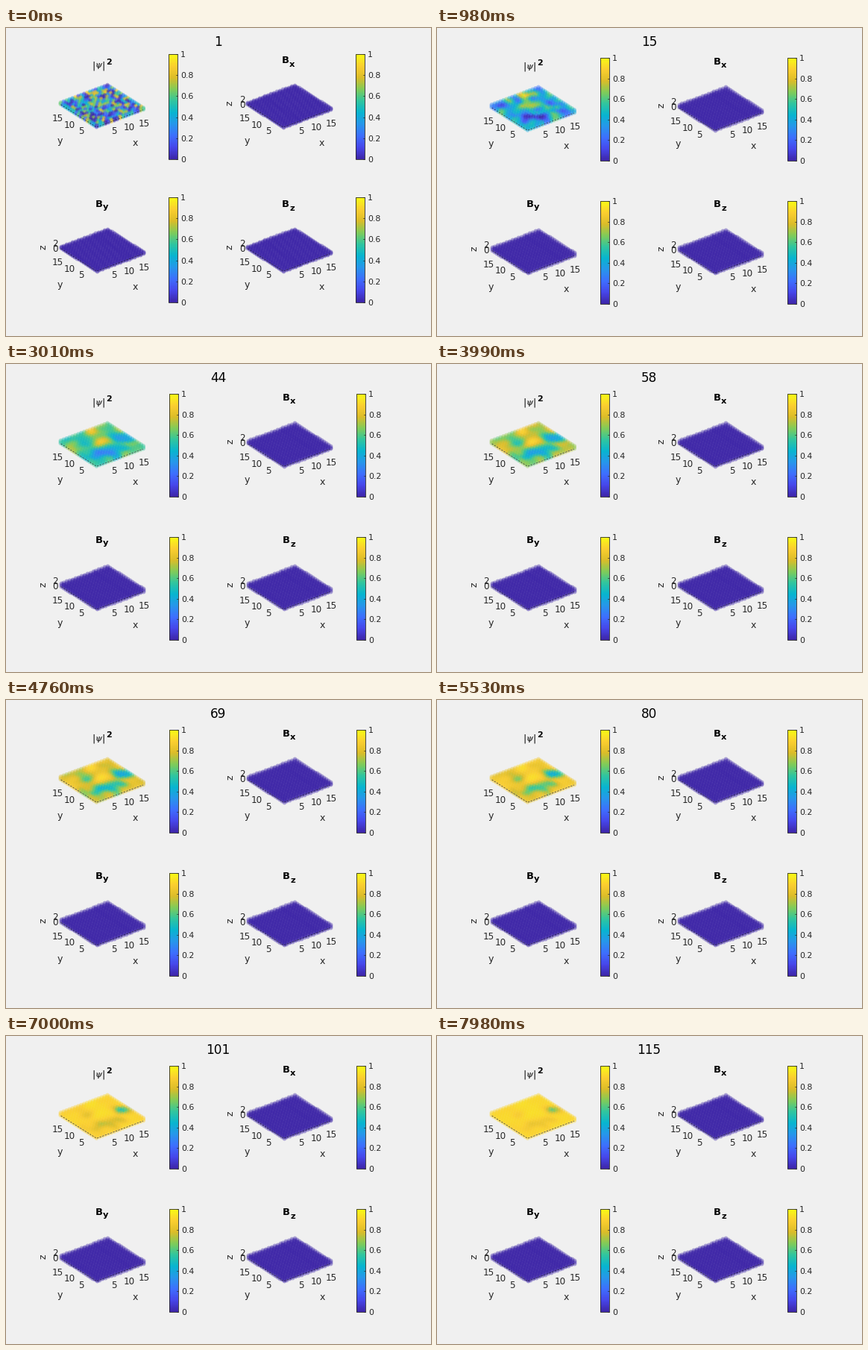
Recreate the animation shown at these times as a matplotlib script. Size 570 by 413 pixels, loop 8000 ms.

```python
import numpy as np
import matplotlib
import matplotlib.pyplot as plt
from matplotlib.animation import FuncAnimation
from matplotlib.colors import LinearSegmentedColormap
from matplotlib.patches import Rectangle

W, H, DPI = 570, 413, 100
STEP, FRAMES, HOLD = 40, 200, 70
PX = 72 / DPI
INK = "#262626"
SIDE, LAYERS, ALPHA = 17, 3, .4

matplotlib.rcParams["font.family"] = "DejaVu Sans"
parula = LinearSegmentedColormap.from_list("parula", [
    "#3e26a8", "#4747eb", "#3e6fff", "#2797eb", "#08b5d0",
    "#31c69f", "#81cc59", "#dcbd29", "#fccf30", "#f9fb15"])

fig = plt.figure(figsize=(W / DPI, H / DPI), dpi=DPI, facecolor="#f0f0f0")
ax = fig.add_axes([0, 0, 1, 1])

# Lattice seen from azimuth -37.5, elevation 30, sorted back to front
UX, UY = np.array([3.91, -1.46]), np.array([-3.0, -1.90])
J, I = (g.ravel() for g in np.mgrid[0:SIDE, 0:SIDE])
order = np.argsort(I * UX[1] + J * UY[1], kind="stable")
I, J = I[order], J[order]


# --- field -----------------------------------------------------------
rng = np.random.default_rng(11)
freq = 2 * np.pi * np.fft.fftfreq(SIDE)
k2 = freq[:, None] ** 2 + freq[None, :] ** 2


def smooth(grid, sigma):
    """Periodic Gaussian blur, rescaled to zero mean and unit spread."""
    out = np.fft.ifft2(np.fft.fft2(grid) * np.exp(-k2 * sigma ** 2 / 2)).real
    return (out - out.mean()) / out.std()


def dip(i, j, r):
    return np.exp(-((I - i) ** 2 + (J - j) ** 2) / (2 * r * r))


grain = rng.uniform(-1, 1, (SIDE, SIDE))
# Steps by which each site lags behind in the rise to full density
delay = 12 * smooth(rng.normal(size=(SIDE, SIDE)), 1.2)[J, I] - 4
delay += 44 * (dip(14, 7.1, 1.7) + dip(5.6, 4.4, 1.7))
delay += 22 * (dip(12.2, 1.4, 1.8) + dip(4.8, 11, 1.5))


def density(n):
    rise = 1 / (1 + np.exp((54 + delay - n) / 16))
    rough = smooth(grain, .26 * np.sqrt(n - 1))[J, I]
    return np.clip(.36 + .56 * rise + .27 * np.exp((1 - n) / 30) * rough, 0, 1)


def colours(n):
    return np.repeat(parula(density(n)), LAYERS, axis=0)


# --- drawing helpers -------------------------------------------------
def put(x, y, s, size=12, drop=.365, ha="center", color=INK, **kw):
    """Text whose visible middle lies at (x, y)."""
    return ax.text(x, y + drop * size, s, fontsize=size * PX, ha=ha,
                   va="baseline", color=color, zorder=5, **kw)


def middle(letter):
    return .17 if letter == "y" else .27


def slab(corner, thick, color):
    ground = corner + I[:, None] * UX + J[:, None] * UY
    pts = np.repeat(ground, LAYERS, axis=0)
    pts[:, 1] -= np.tile(np.linspace(0, thick, LAYERS), len(ground))
    dots = ax.scatter(pts[:, 0], pts[:, 1], s=(5.9 * PX) ** 2, c=color,
                      alpha=ALPHA, linewidths=0, zorder=3)
    path = corner + np.array([16 * UY, 0 * UX, 16 * UX]) + [0, .5]
    edge, = ax.plot(path[:, 0], path[:, 1], color="#1a1a2a", lw=.55,
                    alpha=.8, dashes=(3, 2), zorder=4)
    return dots, edge


def bar(x, top, bottom, width=12):
    ramp = np.linspace(1, 0, 256)[:, None]
    right = x + width
    out = [ax.imshow(ramp, cmap=parula, vmin=0, vmax=1, aspect="auto",
                     extent=(x, right, bottom, top), zorder=2),
           ax.add_patch(Rectangle((x, top), width, bottom - top, fill=False,
                                  ec=INK, lw=.6, zorder=3))]
    for v in np.linspace(0, 1, 6):
        y = bottom + (top - bottom) * v
        out += ax.plot([right - 2, right], [y, y], color=INK, lw=.5, zorder=3)
        out.append(put(right + 4, y, f"{v:.1g}", 11, ha="left"))
    return out


def title(x, y, sub):
    bold = dict(color="black", weight="bold")
    if sub:
        return [put(x, y, "B", 13, **bold),
                put(x + 9, y + 6, sub, 11.5, drop=middle(sub), **bold)]
    return [put(x - 7, y + 8.5, "|", 12.5, drop=.26, color="black"),
            put(x - .5, y + 8.5, "ψ", 11.5, drop=.2, family="DejaVu Serif",
                style="italic", color="black"),
            put(x + 6.5, y + 8.5, "|", 12.5, drop=.26, color="black"),
            put(x + 13.5, y + 2, "2", 11, **bold)]


def panel(dx, dy, sub, fall):
    """Labels of one plot; fall is how far its front corner has dropped."""
    out = title(124.5 + dx, 235.5 + dy, sub)
    base = 331 + fall + dy
    for m in range(3):
        tick = str(5 + 5 * m)
        out.append(put(101.3 + dx - 16 * m, base - 8.7 * m, tick))
        out.append(put(145.3 + dx + 20 * m, base - 5.1 * m, tick))
    out.append(put(72.7 + dx, base + 14.8, "y", 12.5, drop=middle("y")))
    out.append(put(173.2 + dx, base + 16.5, "x", 12.5, drop=middle("x")))
    if sub:
        z = 296 + fall / 2 + dy
        out += [put(66.3 + dx, z, "0"), put(66.3 + dx, z - 7, "2"),
                ax.text(56.5 + dx, z - 2, "z", rotation=90, ha="right",
                        va="center", fontsize=12.5 * PX, color=INK, zorder=5)]
    return out


def layout(right, up, fall, bar_x, bar_top, bar_len):
    """All artists of one layout, and the dots that change colour."""
    out, live = [], None
    for sub, dx, dy in zip(["", "x", "y", "z"], [0, right] * 2,
                           [up, up, 0, 0]):
        color = [parula(0.0)] if sub else colours(1)
        corner = np.array([121.5 + dx, 325.6 + fall + dy])
        dots, edge = slab(corner, 2.2 + fall / 2, color)
        live = live or dots
        out += panel(dx, dy, sub, fall) + [dots, edge]
    for x in (bar_x, bar_x + 251):
        for top in (bar_top, bar_top + 192):
            out += bar(x, top, top + bar_len)
    return out, live


first, first_dots = layout(250.5, -193, 0, 218, 35, 141)
later, later_dots = layout(251, -191.5, 2.7, 219, 40, 138)
counter = put(284.5, 17.5, "1", 16.9, color="black")

ax.set_xlim(0, W)
ax.set_ylim(H, 0)
ax.axis("off")


def update(k):
    n = (k * STEP + 30) // HOLD + 1
    opening = n == 1
    for group, on in ((first, opening), (later, not opening)):
        for artist in group:
            artist.set_visible(on)
    dots = first_dots if opening else later_dots
    dots.set_facecolor(colours(n))
    dots.set_alpha(ALPHA)
    counter.set_text(str(n))
    return [counter, dots]


anim = FuncAnimation(fig, update, frames=FRAMES, interval=STEP,
                     init_func=lambda: update(0), repeat=True, repeat_delay=0)
plt.show()
```
